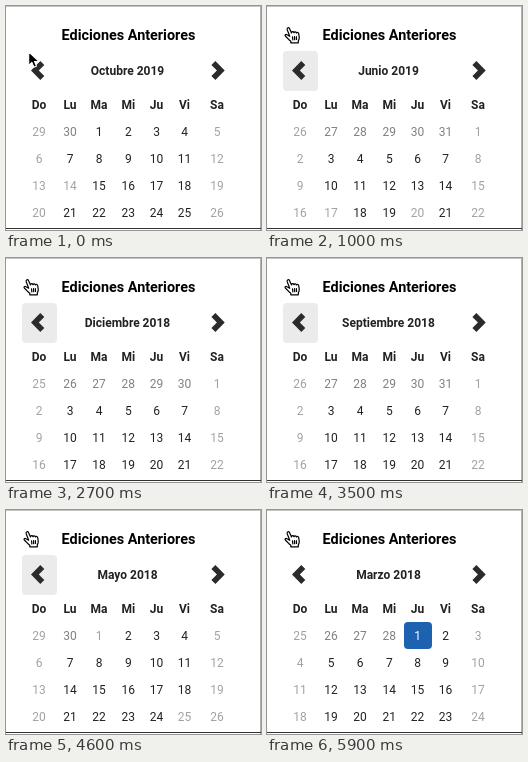
These frames come from a looping animation (255 px wide and 224 px high, 7.8 s). An HTML page:

```html
<!DOCTYPE html>
<html lang="es">
<head>
<meta charset="utf-8">
<title>Ediciones Anteriores</title>
<style>
  html, body { margin: 0; width: 100%; height: 100%; overflow: hidden; background: #fff; }
  svg { display: block; width: 255px; height: 224px; font: 400 12px Roboto, sans-serif; fill: #222; }
  text { text-anchor: middle; }
  .bold { font-weight: 700; }
  .title { font-size: 14.4px; font-weight: 700; fill: #000; }
  .off { fill: #a2a2a2; }
  .old { fill: #808080; }
  .picked { fill: #fff; }
</style>
</head>
<body>
<svg id="stage" viewBox="0 0 255 224">
  <rect width="255" height="224" fill="#fff"/>
  <rect width="255" height="1" fill="#c4c4c4"/>
  <rect x="254" width="1" height="224" fill="#b0b0b0"/>
  <rect y="222" width="255" height="1" fill="#333"/>
  <text class="title" x="122.5" y="34">Ediciones Anteriores</text>
  <rect id="hover" x="16" y="45" width="35" height="40" rx="4" fill="#ebebeb"/>
  <path id="chevron" fill="#2b2b2b" d="M25 64.5 34.3 55l4 4-5.5 5.5 5.5 5.5-4 4z"/>
  <use href="#chevron" transform="translate(243.7 0) scale(-1 1)"/>
  <text id="month" class="bold" x="121.5" y="69"></text>
  <rect id="mark" x="137" y="112" width="28" height="27" rx="4" fill="#1c62b1"/>
  <g id="grid"></g>
  <path id="arrow" d="M.7.8v13.6l3.2-3 2 4.8 2.6-1.1-2-4.6h4.6z"
    fill="#000" stroke="#fff" stroke-width="1.1" stroke-linejoin="round"/>
  <g id="hand" fill="#fff" stroke="#000" stroke-width="1.2" stroke-linejoin="round" stroke-linecap="round">
    <path d="M6.2 10.8 3.7 4.2C3.2 2.2 5.3 1.4 6.1 3.2L8 7.4c.1-1.5 2-1.7 2.5-.2.5-1.2 2.1-1.1 2.5.3.6-.9 2-.6 2.2.7l.5 3.2c.3 1.8-.3 3-.9 4v1.9H7.3v-1.5C5.2 14.3 4 12.4 2 10.8.8 9.5 2.1 8.3 3.5 9.2z"/>
    <path fill="none" d="M9 11.3l.4 3M11 11.2l.2 3M12.9 11l.1 3"/>
  </g>
</svg>
<script>
  const LOOP = 7800;
  const SVG_NS = "http://www.w3.org/2000/svg";
  const MONTHS = ["Enero", "Febrero", "Marzo", "Abril", "Mayo", "Junio", "Julio", "Agosto",
    "Septiembre", "Octubre", "Noviembre", "Diciembre"];
  const WEEK = ["Do", "Lu", "Ma", "Mi", "Ju", "Vi", "Sa"];
  const COLS = [33, 64, 93, 122.3, 150.5, 178.5, 211];
  const FIRST = 2019 * 12 + 9;

  // Times at which the calendar steps back one month
  const CLICKS = [100, 400, 700, 1000, 1300, 1500, 1800, 2100, 2400, 2700, 2900,
    3200, 3500, 3800, 4100, 4300, 4600, 4900, 5200];

  // Days without an edition, by year and month
  const CLOSED = {
    "2019-10": [14], "2019-8": [19], "2019-7": [8, 9], "2019-6": [17, 20], "2019-5": [1],
    "2019-4": [2, 18, 19], "2019-3": [4, 5], "2019-1": [1], "2018-11": [19], "2018-10": [15],
    "2018-8": [20], "2018-7": [9], "2018-6": [20], "2018-5": [1, 25], "2018-4": [2]
  };

  // Arrow pointer: time, x, y (no position = hidden)
  const POINTER = [
    [0, 22, 45], [100, 29, 47], [300, 29, 33], [400, 27, 21], [600, 24, 22],
    [700, 22, 21], [800, 20, 21], [1000], [5600, 151.5, 113.5], [5900]
  ];

  const el = id => document.getElementById(id);
  const show = (id, on) => el(id).setAttribute("visibility", on ? "visible" : "hidden");

  function addText(x, y, parent, cls) {
    const node = document.createElementNS(SVG_NS, "text");
    node.setAttribute("x", x);
    node.setAttribute("y", y);
    node.setAttribute("class", cls);
    return parent.appendChild(node);
  }

  const grid = el("grid");
  WEEK.forEach((name, i) => addText(COLS[i], 103, grid, "bold").textContent = name);
  const cells = Array.from({ length: 28 }, (_, i) =>
    addText(COLS[i % 7], 130 + 27 * Math.floor(i / 7), grid, ""));

  function drawMonth(index, picked) {
    const year = Math.floor(index / 12), month = index % 12;
    const closed = CLOSED[`${year}-${month + 1}`] || [];
    const last = new Date(Date.UTC(year, month, 0));
    const start = last.getUTCDate() - last.getUTCDay();
    el("month").textContent = `${MONTHS[month]} ${year}`;
    cells.forEach((cell, i) => {
      const date = new Date(Date.UTC(year, month - 1, start + i));
      const day = date.getUTCDate(), inside = date.getUTCMonth() === month;
      const weekend = i % 7 === 0 || i % 7 === 6;
      let cls = "";
      if (weekend || (inside && closed.includes(day))) cls = "off";
      else if (!inside) cls = "old";
      else if (picked && day === 1) cls = "picked";
      cell.textContent = day;
      cell.setAttribute("class", cls);
    });
  }

  let drawn = "";
  function render(t) {
    const steps = CLICKS.filter(c => c <= t).length;
    const picked = t >= 5600;
    const key = `${steps} ${picked}`;
    if (key !== drawn) drawMonth(FIRST - steps, picked);
    drawn = key;

    show("mark", picked);
    show("hover", t >= 1000 && t < 5300);
    show("hand", t >= 1000);
    const [, x, y] = POINTER.filter(p => p[0] <= t).pop();
    show("arrow", x !== undefined);
    if (x !== undefined) el("arrow").setAttribute("transform", `translate(${x} ${y})`);
  }

  el("hand").setAttribute("transform", "translate(16.5 19.5)");
  const began = performance.now();
  function tick() {
    render((performance.now() - began) % LOOP);
    requestAnimationFrame(tick);
  }
  tick();
</script>
</body>
</html>
```
